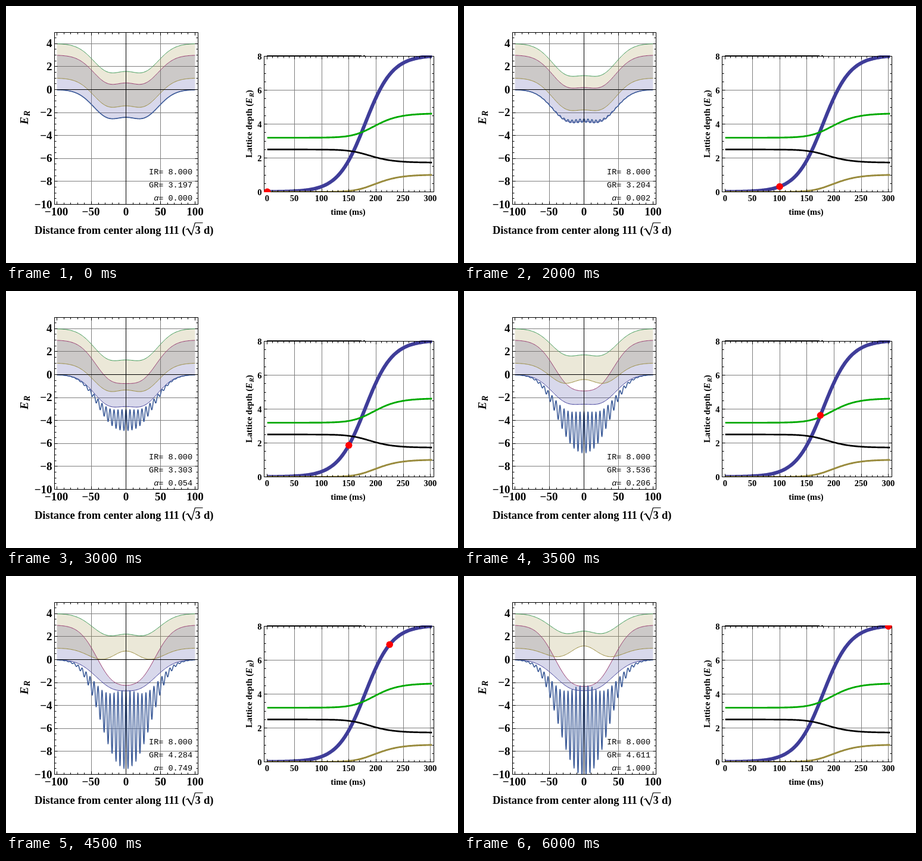
An HTML page for the animation above (6500 ms loop, 759 by 432 pixels).

```html
<!DOCTYPE html>
<html>
<head>
<meta charset="utf-8">
<style>
html, body { margin: 0; width: 759px; height: 432px; overflow: hidden; background: #fff; }
svg { display: block; }
text { font-family: 'Liberation Serif', serif; font-weight: bold; font-size: 19px; white-space: pre; }
.small { font-size: 14.5px; }
.mono { font: 13.5px 'Liberation Mono', monospace; }
.it { font-style: italic; }
.line { fill: none; stroke-linejoin: round; }
</style>
</head>
<body>
<svg id="stage" width="759" height="432" viewBox="0 0 759 432">
  <clipPath id="clipL"><rect x="81" y="44" width="242" height="290"/></clipPath>
  <clipPath id="clipR"><rect x="433" y="83" width="286" height="230"/></clipPath>
</svg>
<script>
const svg = document.getElementById('stage');

function add(parent, tag, attrs, text) {
  const el = document.createElementNS('http://www.w3.org/2000/svg', tag);
  for (const k in attrs) el.setAttribute(k, attrs[k]);
  if (text !== undefined) el.textContent = text;
  parent.appendChild(el);
  return el;
}
const label = (x, y, text, anchor, cls = '') =>
  add(svg, 'text', { x, y, 'text-anchor': anchor, class: cls }, text);
const stroke = (parent, color, width, d = '') =>
  add(parent, 'path', { d, class: 'line', stroke: color, 'stroke-width': width });
const clipped = id => add(svg, 'g', { 'clip-path': `url(#${id})` });
const half = v => Math.floor(v) + 0.5;
const num = v => String(v).replace('-', '\u2212');

const left = { x0: 81.5, x1: 322.5, y0: 44.5, y1: 333.5,
  x: v => 201.5 + 1.16 * v, y: v => 140.5 - 19.3 * v };
const right = { x0: 433.5, x1: 718.5, y0: 84.5, y1: 312.5,
  x: v => 438.7 + 0.9133 * v, y: v => 312.5 - 28.5 * v };

function range(a, b, step) {
  const out = [];
  for (let v = a; v <= b + 1e-9; v += step) out.push(v);
  return out;
}

function grid(p, xs, ys) {
  let d = '';
  xs.forEach(v => d += `M${half(p.x(v))} ${p.y0}V${p.y1}`);
  ys.forEach(v => d += `M${p.x0} ${half(p.y(v))}H${p.x1}`);
  stroke(svg, '#808080', 1, d);
}

function frame(p, xs, ys, xMajor, yMajor) {
  let d = `M${p.x0} ${p.y0}H${p.x1}V${p.y1}H${p.x0}Z`;
  xs.forEach(v => {
    const n = v % xMajor ? 3 : 5, x = half(p.x(v));
    d += `M${x} ${p.y0}v${n}M${x} ${p.y1}v${-n}`;
  });
  ys.forEach(v => {
    const n = v % yMajor ? 3 : 5, y = half(p.y(v));
    d += `M${p.x0} ${y}h${n}M${p.x1} ${y}h${-n}`;
  });
  stroke(svg, '#000', 1, d);
}

const points = (p, xs, f) =>
  xs.map(v => p.x(v).toFixed(2) + ' ' + p.y(f(v)).toFixed(2));
const path = pts => 'M' + pts.join('L');

// Lattice ramp: depth, retro fraction and compensation
const DEPTH = 8;
const ramp = t => DEPTH * (1 + Math.exp(-4.8)) / (1 + Math.exp((180 - t) / 25));
const alpha = t => (ramp(t) / DEPTH) ** 2;
function green(t) {
  const q = ramp(t) / DEPTH, b = 0.095 + 0.09 * q;
  return 3.1966 + 1.4142 * (b * q + (1 - b) * q * q);
}

// Lowest Mathieu characteristic value of one symmetry class
function lowest(q, d, k, o) {
  let v = d;
  for (let i = 0; i < 14; i++)
    v = d - o / ((k + 2) ** 2 - v - q * q / ((k + 4) ** 2 - v));
  return v;
}

const beam = x => Math.exp(-x * x / 1505);
const comp = x => Math.exp(-1.37 * x * x / 1505);

function model(t) {
  const s = ramp(t), gr = green(t);
  const sBand = s * (1 - Math.exp(-0.79 * s ** 1.3));
  const floor = x => -12 * (1 + s / DEPTH) * beam(x) + 3 * gr * comp(x);
  return {
    potential: x => floor(x) + s * beam(x) * Math.cos(Math.PI * x * Math.sqrt(3) / 10) ** 2,
    bands(x) {
      const q = sBand * beam(x) / 4, q2 = q * q;
      const a0 = lowest(q, 0, 0, 2 * q2);
      const base = floor(x) + 3 * (a0 + 2 * q);
      return [
        base,
        base + 3 * (lowest(q, 1 - q, 1, q2) - a0),
        base + lowest(q, 1 + q, 1, q2) - a0,
        base + lowest(q, 4, 2, q2) - a0
      ];
    }
  };
}

// Left plot
grid(left, [-50, 50], [4, 2, -2, -4, -6, -8]);
const plotL = clipped('clipL');
const fills = ['#3f3d99', '#998b3d'].map(fill =>
  add(plotL, 'path', { fill, 'fill-opacity': 0.2 }));
const edges = ['#3f3d99', '#993d71', '#998b3d', '#3d9956'].map(c => stroke(plotL, c, 1));
const wave = stroke(plotL, '#3d5c99', 1.6);
stroke(svg, '#000', 1, 'M201.5 44V334M81 140.5H323');
frame(left, range(-100, 100, 10), range(-10, 5, 0.5), 50, 2);
range(-100, 100, 50).forEach(v => label(left.x(v) - (v < 0 ? 1 : 0), 352, num(v), 'middle'));
range(-10, 4, 2).forEach(v => label(77.5, left.y(v) + 6, num(v), 'end'));

const axisName = add(svg, 'text', { transform: 'translate(37 199) rotate(-90)', class: 'it' }, 'E');
add(axisName, 'tspan', { dx: 1, dy: 3, 'font-size': 14 }, 'R');
label(48, 383, 'Distance from center along 111 (', 'start').style.fontSize = '18.5px';
stroke(svg, '#000', 1.2, 'M302 376l3.5-2 6 11 6-20.5h13');
stroke(svg, '#000', 2.2, 'M305.5 375l5.5 9');
label(317.5, 383, '3', 'start').style.fontSize = '18.5px';
label(332, 383, 'd)', 'start').style.fontSize = '18.5px';
const readout = ['IR', 'GR', '\u03b1'].map((name, i) => {
  const el = label(313, 282.5 + 22 * i, '', 'end', 'mono');
  add(el, 'tspan', i === 2 ? { class: 'it' } : {}, name);
  return add(el, 'tspan', {});
});

// Right plot
grid(right, range(50, 300, 50), [2, 4, 6]);
const plotR = clipped('clipR');
const times = range(0, 303, 1.5);
const curve = (f, color, width) => stroke(plotR, color, width, path(points(right, times, f)));
curve(ramp, '#3f3d99', 6);
stroke(plotR, '#000', 2, 'M438 84H597M600 84H603');
curve(t => DEPTH / green(t), '#000', 2.7);
curve(green, '#00aa00', 2.9);
curve(alpha, '#998b3d', 2.9);
frame(right, range(0, 300, 10), range(0, 8, 0.5), 50, 2);
const dot = add(clipped('clipR'), 'circle', { r: 5.8, fill: '#f00' });
range(0, 300, 50).forEach(v => label(right.x(v) - 0.4, 328, v, 'middle', 'small'));
range(0, 8, 2).forEach(v => label(429.5, right.y(v) + 5, v, 'end', 'small'));
label(574.5, 351, 'time (ms)', 'middle', 'small');
const depthName = add(svg, 'text', { transform: 'translate(413 255) rotate(-90)', class: 'small' }, 'Lattice depth (');
add(depthName, 'tspan', { class: 'it' }, 'E');
add(depthName, 'tspan', { class: 'it', dx: 1, dy: 2.5, 'font-size': 11 }, 'R');
add(depthName, 'tspan', { dy: -2.5 }, ')');

const coarse = range(-100, 100, 1), fine = range(-100, 100, 0.4);

function draw(t) {
  const m = model(t);
  const rows = coarse.map(m.bands);
  const lines = edges.map((el, i) => {
    const pts = points(left, coarse, x => rows[x + 100][i]);
    el.setAttribute('d', path(pts));
    return pts;
  });
  fills.forEach((el, i) =>
    el.setAttribute('d', path(lines[2 * i].concat(lines[2 * i + 1].slice().reverse())) + 'Z'));
  wave.setAttribute('d', path(points(left, fine, m.potential)));
  [DEPTH, green(t), alpha(t)].forEach((v, i) => readout[i].textContent = '= ' + v.toFixed(3));
  dot.setAttribute('cx', right.x(t));
  dot.setAttribute('cy', right.y(ramp(t)));
}

const STEP = 500, COUNT = 13, start = performance.now();
let shown = -1;
function tick() {
  const n = Math.floor((performance.now() - start) / STEP) % COUNT;
  if (n !== shown) draw(25 * (shown = n));
  requestAnimationFrame(tick);
}
tick();
</script>
</body>
</html>
```
